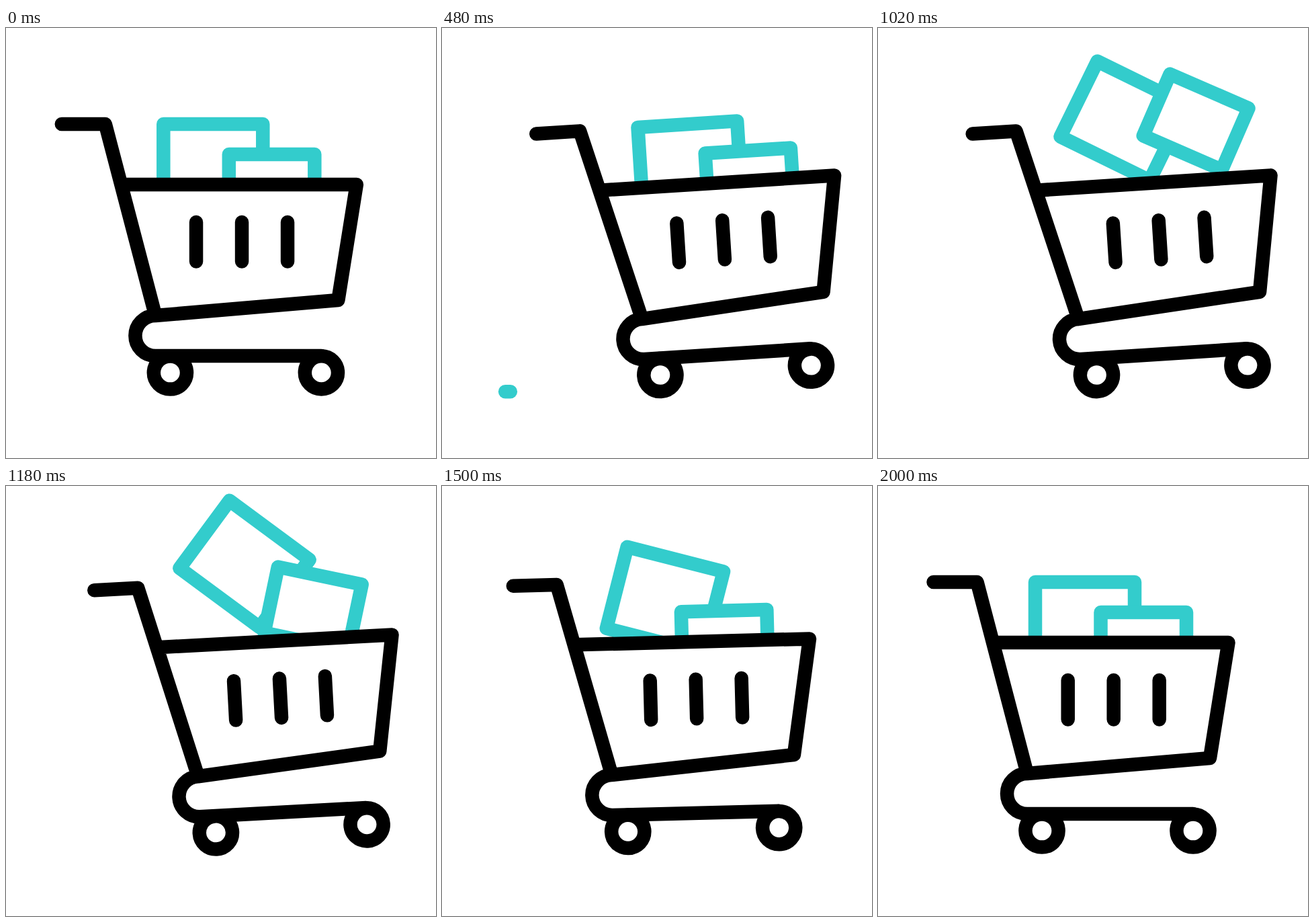
An HTML page that plays this animation: 640x640 px, repeating every 2420 ms.

```html
<!DOCTYPE html>
<html lang="en">
<head>
<meta charset="utf-8">
<title>Shopping cart</title>
<style>
  html, body { margin: 0; height: 100%; overflow: hidden; background: #fff; }
  svg { display: block; width: 100%; height: 100%; }
</style>
</head>
<body>
<svg viewBox="0 0 640 640" fill="none" stroke="#000" stroke-width="20.5" stroke-linecap="round" stroke-linejoin="round">
  <path id="dash" stroke="#3cc"/>
  <g id="cart">
    <g fill="#fff" stroke="#3cc">
      <rect id="back" x="234" y="143" width="148" height="125"/>
      <rect id="front" x="331.5" y="188" width="127.5" height="100"/>
    </g>
    <path fill="#fff" stroke="none" d="M171 233H521.5L494 405L222 428Z"/>
    <path d="M82.5 143H147.5L222 428M172 233H521.5L494 405L222 428A30 30 0 0 0 222 488H469"/>
    <path d="M282.7 289v58.5m68-58.5v58.5m68-58.5v58.5"/>
    <circle cx="244" cy="513" r="24.6" fill="#fff"/>
    <circle cx="469" cy="513" r="24.6" fill="#fff"/>
  </g>
</svg>
<script>
const LOOP = 2420, PEAK = 800, STOP = 2000;
const [dash, cart, back, front] = ['dash', 'cart', 'back', 'front'].map(id => document.getElementById(id));

// Fast start out to the peak, then a smooth roll back.
function roll(t) {
  if (t >= STOP) return 0;
  if (t < PEAK) return 1.095 * (1 - Math.exp(-3.65 * t / PEAK)) / (1 - Math.exp(-3.65));
  return 1.095 * (1 + Math.cos(Math.PI * (t - PEAK) / (STOP - PEAK))) / 2;
}

function hop(bag, t, start, dx, dy, turn, cx, cy) {
  const u = Math.min(1, Math.max(0, (t - start) / 800));
  const q = Math.sin(Math.PI * u);
  bag.setAttribute('transform', `translate(${dx * q} ${dy * q}) rotate(${turn * q} ${cx} ${cy})`);
}

function drawDash(t) {
  const on = t >= 20 && t < 575;
  dash.style.display = on ? '' : 'none';
  if (!on) return;
  const k = (1 - t / 620) ** 1.5;
  const right = 84 + 168 * k;
  const left = right - 73 * k * Math.min(1, t / 100);
  dash.setAttribute('d', `M${left} 541.3H${right}`);
}

function draw(t) {
  const p = roll(t);
  cart.setAttribute('transform',
    `translate(${81 * p} ${3.5 * p}) rotate(${-3.64 * p} 244 513)`);
  hop(back, t, 805, 0, -90, 39.7, 308, 205.5);
  hop(front, t, 515, 22, -100, 29.7, 395.25, 238);
  drawDash(t);
}

const begin = performance.now();
function tick() {
  draw((performance.now() - begin) % LOOP);
  requestAnimationFrame(tick);
}
draw(0);
requestAnimationFrame(tick);
</script>
</body>
</html>
```
